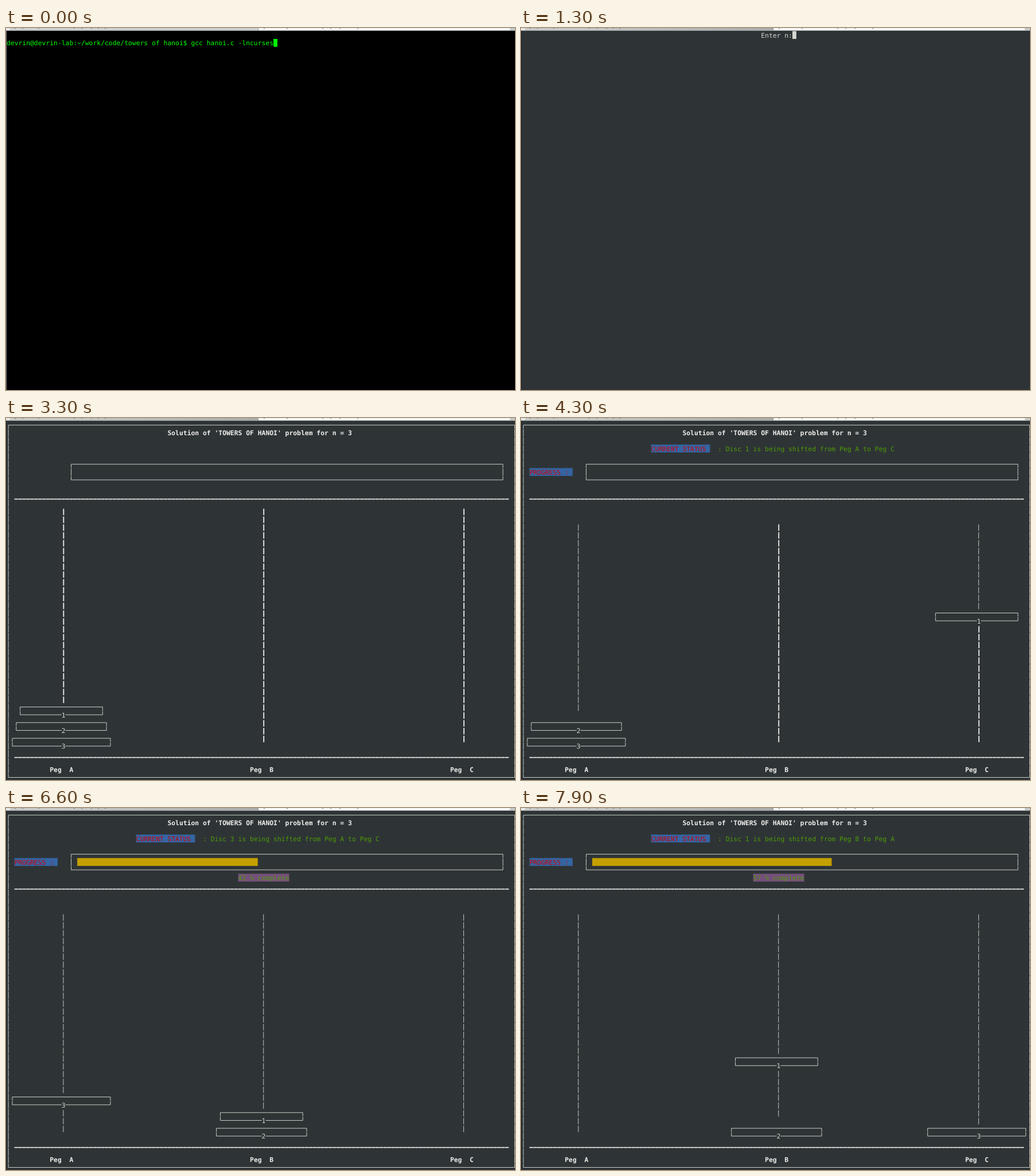
An HTML page that plays this animation: 887 by 632 pixels, repeating every 8 s.

```html
<!DOCTYPE html>
<html lang="en">
<head>
<meta charset="utf-8">
<title>Terminal puzzle</title>
<style>
  html, body { margin: 0; width: 100%; height: 100%; overflow: hidden; background: #000; }
  svg { display: block; width: 887px; height: 632px; }
  text {
    font: 11.36px "DejaVu Sans Mono", monospace;
    text-rendering: geometricPrecision;
    white-space: pre;
  }
  .bold { font-weight: bold; }
  .line { fill: none; stroke: #d3d7cf; stroke-width: .95; }
  .side { stroke-dasharray: 12.8 .87; stroke-dashoffset: 6.4; }
</style>
</head>
<body>
<svg viewBox="0 0 887 632"><g id="screen"></g></svg>
<script>
const LOOP = 8000, TICK = 100;
const CELL_W = 6.84, CELL_H = 13.67;
const SLATE = '#2e3436', GREY = '#d3d7cf', WHITE = '#eeeeec', LIME = '#00ff00';
const screen = document.getElementById('screen');

const X = c => 1 + c * CELL_W;
const Y = r => 5.8 + r * CELL_H;
// Strokes run through the middle of a cell
const lineX = c => X(c) + 3.15;
const lineY = r => Y(r) + 6.55;

const rect = (x, y, w, h, fill) =>
  `<rect x="${x}" y="${y}" width="${w}" height="${h}" fill="${fill}"/>`;
const text = (c, r, s, fill = GREY, cls = '') =>
  `<text x="${X(c)}" y="${Y(r) + 11}" fill="${fill}" class="${cls}">${s}</text>`;
const block = (c, r, n, fill) => rect(X(c), Y(r) - .4, n * CELL_W, CELL_H, fill);
const label = (c, r, s, fill, back) => block(c, r, s.length, back) + text(c, r, s, fill);

function box(c1, r1, c2, r2) {
  const x1 = lineX(c1), x2 = lineX(c2), y1 = lineY(r1), y2 = lineY(r2);
  return `<path class="line" d="M${x1} ${y1}H${x2}M${x1} ${y2}H${x2}"/>`
    + `<path class="line side" d="M${x1} ${y1}V${y2}M${x2} ${y1}V${y2}"/>`;
}

// Sliver of the tab strip along the top edge
function tabs(shaded) {
  let s = rect(0, 0, 440, 4, '#cdd0ce') + rect(440, 0, 447, 4, '#f4f6f5');
  if (shaded) s += rect(0, 0, 440, 4, 'url(#shade)');
  s += rect(0, 0, 7, 4, '#e4e6e4') + rect(878, 0, 9, 4, '#c3c7c5') + rect(439, 1, 1, 3, '#8b8f8d');
  for (const x of [15, 28, 56, 118, 131, 148, 160, 172, 449, 489, 551, 565, 581, 612])
    s += rect(x, 0, 2, 1, '#6a6d6b');
  return s + rect(0, 4, 887, 1, '#9a9d9b');
}

// Shell
const PROMPT = 'devrin@devrin-lab:~/work/code/towers of hanoi$ ';
const COMPILE = PROMPT + 'gcc hanoi.c -lncurses';
const RUN = './a.out';

function shell(t) {
  let s = rect(0, 0, 887, 632, '#000') + text(0, 1, COMPILE, LIME);
  if (t < 400) {
    s += block(COMPILE.length, 1, 1, LIME);
  } else {
    const typed = t < 500 ? '' : PROMPT + RUN.slice(0, (t - 500) / TICK);
    s += text(0, 2, typed, LIME) + block(typed.length, 2, 1, LIME);
  }
  return s + rect(0, 5, 1, 627, '#8c8c8c') + tabs(false);
}

function question(t) {
  const s = 'Enter n:' + (t < 1500 ? '' : '3');
  return text(61, 0, s) + block(61 + s.length, 0, 1, GREY);
}

// Puzzle: peg columns, row limits and step times in ms
const PEGS = [14, 65, 116], TOP = 11, LAST = 40;
const START = 3327.8, ROW_MS = 14.4, COL_MS = 4.037;
// disc, from peg, to peg
const MOVES = [[1, 0, 2], [2, 0, 1], [1, 2, 1], [3, 0, 2], [1, 1, 0]];

function stateAt(elapsed) {
  // Peg cells: 2 bold, 1 redrawn thin, 0 blank
  const pegs = PEGS.map(() => {
    const cells = [];
    for (let r = TOP; r <= LAST; r++) cells[r] = 2;
    return cells;
  });
  const stacks = [[3, 2, 1], [], []];
  const discs = {};
  const wipe = (p, r) => { pegs[p][r] = pegs[p][r + 1] = 0; };
  stacks[0].forEach((d, i) => {
    discs[d] = { col: PEGS[0], row: LAST - 2 * i };
    wipe(0, LAST - 2 * i);
  });

  let done = 0, left = elapsed, move = null;
  for (const m of MOVES) {
    if (left < 0) break;
    move = m;
    const [d, from, to] = m, disc = discs[d];
    const first = disc.row, end = LAST - 2 * stacks[to].length;
    const span = Math.abs(PEGS[to] - PEGS[from]), dir = Math.sign(to - from);

    const up = Math.min(first - TOP, Math.floor(left / ROW_MS));
    for (let i = 0; i < up; i++) {
      disc.row--;
      wipe(from, disc.row);
      if (disc.row + 2 <= first) pegs[from][disc.row + 2] = 1;
    }
    left -= (first - TOP) * ROW_MS;
    if (left < 0) break;

    const across = Math.min(span, Math.floor(left / COL_MS));
    for (let i = 0; i < across; i++) {
      disc.col += dir;
      PEGS.forEach((c, p) => { if (Math.abs(c - disc.col) < 11 + d) wipe(p, TOP); });
    }
    left -= span * COL_MS;
    if (left < 0) break;

    const down = Math.min(end - TOP, Math.floor(left / ROW_MS));
    for (let i = 0; i < down; i++) {
      disc.row++;
      wipe(to, disc.row);
      if (disc.row - 1 >= TOP + 2) pegs[to][disc.row - 1] = 1;
    }
    left -= (end - TOP) * ROW_MS;
    if (left < 0) break;

    stacks[to].push(stacks[from].pop());
    done++;
  }
  return { pegs, discs, done, move };
}

function drawDisc(d, { col, row }) {
  const half = 10 + Number(d);
  return box(col - half, row, col + half - 1, row + 1)
    + rect(X(col), lineY(row + 1) - 1, CELL_W, 2, SLATE)
    + text(col, row + 1, d);
}

function rule(r) {
  let s = '';
  for (let c = 2; c < 128; c++) s += rect(X(c), Y(r) + 11.9, CELL_W - .3, 1.7, WHITE);
  return s;
}

function board(t) {
  const { pegs, discs, done, move } = stateAt(t - START);
  let s = box(0, 0, 129, 45) + box(16, 5, 126, 7) + rule(9) + rule(42)
    + text(41, 1, "Solution of 'TOWERS OF HANOI' problem for n = 3", WHITE, 'bold');

  if (move) {
    const [d, from, to] = move, name = p => 'Peg ' + 'ABC'[p];
    s += label(33, 3, 'CURRENT STATUS ', '#cc0000', '#3465a4')
      + text(50, 3, `: Disc ${d} is being shifted from ${name(from)} to ${name(to)}`, '#4e9a06')
      + label(2, 6, 'PROGRESS : ', '#cc0000', '#3465a4');
  }
  if (done) {
    s += block(18, 6, 15 * done + 1, '#c4a000')
      + label(59, 8, `${Math.floor(done * 100 / 7)} % complete`, '#4e9a06', '#75507b');
  }

  pegs.forEach((cells, p) => {
    const x = X(PEGS[p]) + 2.7;
    cells.forEach((weight, r) => {
      if (weight) s += rect(x, Y(r) + 2.2, weight * .9, 11.2, weight > 1 ? WHITE : GREY);
    });
    s += text(PEGS[p] - 3, 44, 'Peg  ' + 'ABC'[p], WHITE, 'bold');
  });
  for (const d in discs) s += drawDisc(d, discs[d]);
  return s;
}

const SHADE = '<linearGradient id="shade"><stop offset=".2" stop-color="#c6c9c7"/><stop offset="1" stop-color="#a9acaa"/></linearGradient>';

function draw(t) {
  if (t < 1300) return shell(t);
  return SHADE + rect(0, 0, 887, 632, SLATE) + rect(0, 5, 1, 627, '#1d2122')
    + tabs(true) + (t < 2200 ? question(t) : board(t));
}

const begin = performance.now();
let shown = -1;
function frame(now) {
  const t = Math.floor(Math.max(0, now - begin) % LOOP / TICK) * TICK;
  if (t !== shown) {
    screen.innerHTML = draw(t);
    shown = t;
  }
  requestAnimationFrame(frame);
}
frame(begin);
</script>
</body>
</html>
```
